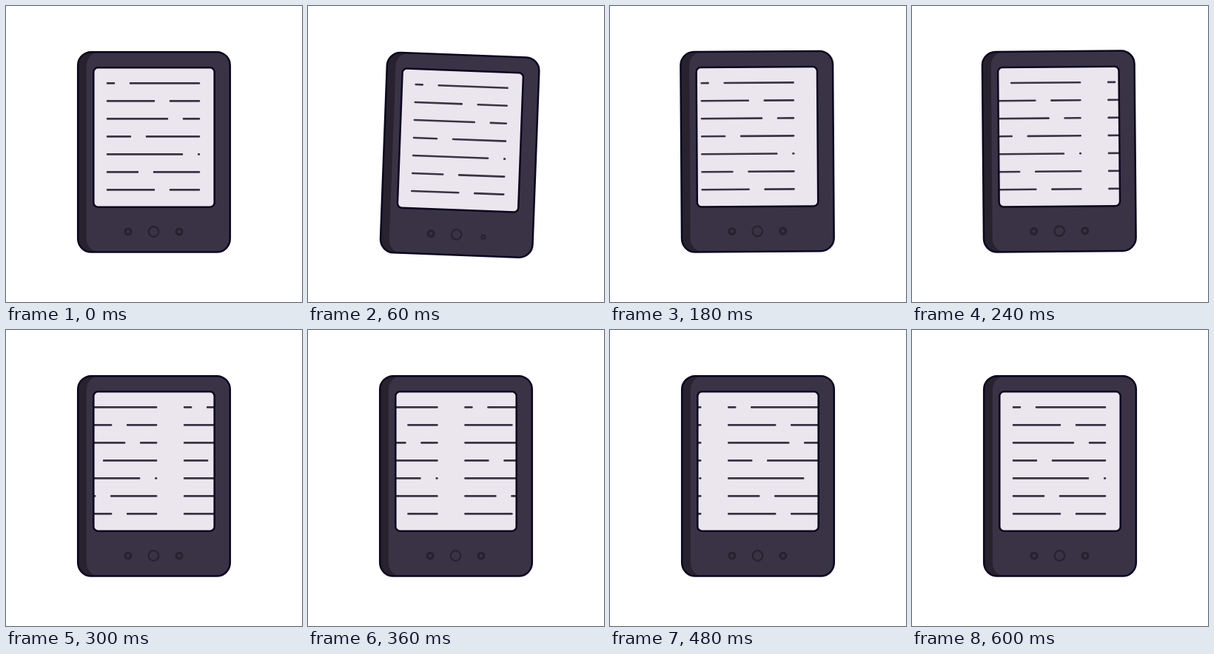
Animation, 400 px wide and 400 px high, one loop 2160 ms. Source, as an HTML page:

```html
<!DOCTYPE html>
<html lang="en">
<head>
<meta charset="utf-8">
<title>E-reader page turn</title>
<style>
  html, body { margin: 0; width: 100%; height: 100%; overflow: hidden; background: #fff; }
  svg { display: block; width: 100vw; height: 100vh; }
  .ink { fill: none; stroke: #0a0720; stroke-width: 2.5; }
  .button { fill: none; stroke: #28222f; }
  #text { fill: none; stroke: #3a3346; stroke-width: 2.6; stroke-linecap: round; }
</style>
</head>
<body>
<svg viewBox="0 0 400 400">
  <defs>
    <clipPath id="caseClip"><rect x="97.2" y="62.2" width="205.6" height="270.4" rx="18"/></clipPath>
    <clipPath id="screenClip"><rect x="118.3" y="83.3" width="163.4" height="188.4" rx="6"/></clipPath>
  </defs>
  <g id="reader">
    <g clip-path="url(#caseClip)">
      <rect x="97" y="62" width="206" height="271" fill="#28222f"/>
      <rect x="109" y="62" width="206" height="271" rx="18" fill="#3a3346"/>
    </g>
    <rect class="ink" x="97.2" y="62.2" width="205.6" height="270.4" rx="18"/>
    <rect x="118.3" y="83.3" width="163.4" height="188.4" rx="6" fill="#ebe6ed"/>
    <g clip-path="url(#screenClip)"><path id="text"/></g>
    <rect class="ink" x="118.3" y="83.3" width="163.4" height="188.4" rx="6"/>
    <circle class="button" cx="165" cy="305" r="3.9" stroke-width="3.4"/>
    <circle class="button" cx="199.5" cy="305" r="6.8" stroke-width="2.2"/>
    <circle class="button" id="next" cx="234" cy="305" r="3.9" stroke-width="3.4"/>
  </g>
</svg>
<script>
const LOOP = 2160, STEP = 30, PAGE = 162;
const LEFT = 137, RIGHT = 261, TOP = 104.4, LEADING = 24;

// Each row of text has one gap: [start, end].
const gaps = [[146, 168], [200, 222], [218, 240], [168, 190], [238, 260.2], [178, 200], [200, 222]];

// Tracks are [time in ms, value], eased between neighbours.
const tilt = [[0, 0], [90, 2.9], [210, -1], [270, 0]];
const press = [[0, 1], [105, 0.4], [180, 1]];
const scroll = [[97, 0], [600, PAGE]];

const byId = id => document.getElementById(id);
const reader = byId('reader'), text = byId('text'), next = byId('next');

const pageRows = x => gaps.map(([a, b], i) => {
  const y = TOP + i * LEADING;
  const end = Math.max(RIGHT, b + 0.1);
  return `M${LEFT + x} ${y}H${a + x}M${b + x} ${y}H${end + x}`;
}).join('');

function valueAt(track, t) {
  if (t <= track[0][0]) return track[0][1];
  for (let i = 1; i < track.length; i++) {
    const [t0, v0] = track[i - 1], [t1, v1] = track[i];
    if (t < t1) {
      const u = (t - t0) / (t1 - t0);
      return v0 + (v1 - v0) * u * u * (3 - 2 * u);
    }
  }
  return track[track.length - 1][1];
}

function draw(t) {
  const s = valueAt(press, t);
  reader.setAttribute('transform', `rotate(${valueAt(tilt, t)} 97 337)`);
  text.setAttribute('transform', `translate(${-valueAt(scroll, t)} 0)`);
  // The button shrinks towards its lower right corner.
  next.setAttribute('transform', `translate(239.6 310.6) scale(${s}) translate(-239.6 -310.6)`);
}

text.setAttribute('d', pageRows(0) + pageRows(PAGE));
const start = performance.now();

function tick() {
  const t = (performance.now() - start) % LOOP;
  draw(Math.floor(t / STEP) * STEP);
  requestAnimationFrame(tick);
}
tick();
</script>
</body>
</html>
```
